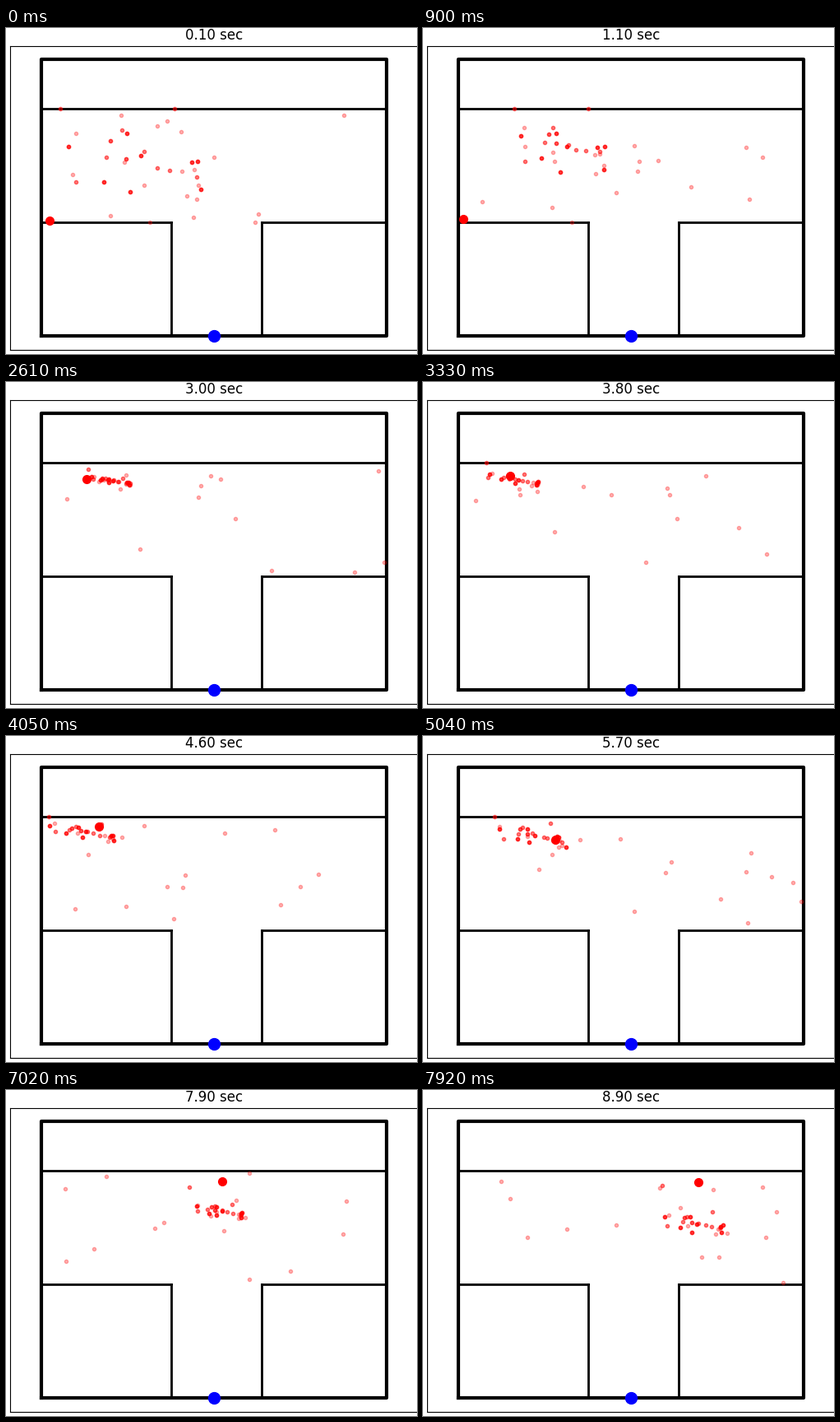
Animation, 500 px wide and 396 px high, one loop 8010 ms. Source, as a matplotlib script:

```python
import numpy as np
import matplotlib.pyplot as plt
from matplotlib.animation import FuncAnimation

W, H, DPI = 500, 396, 100
STEPS, INTERVAL = 89, 90
X0, X1, Y0, Y1 = 43, 463, 98.4, 236.4  # walkable strip
FLOOR, CEIL = 374.4, 38.4
GROUPS, STRAYS = 26, 13
SLOPE = 0.17  # tilt of the swarm

# step, estimate x, y, swarm centre x, y, half length, scatter
KEYS = np.array([
    (0, 53, 234, 145, 160, 95, 36),
    (20, 45, 230, 180, 130, 28, 14),
    (29, 98, 118, 124, 119, 28, 2),
    (45, 113, 110, 88, 116, 45, 6),
    (56, 161, 126, 125, 120, 48, 9),
    (67, 183, 110, 176, 129, 26, 1),
    (88, 335, 112, 325, 162, 42, 9),
])

# each group of resampled particles keeps its place within the swarm
seeds = np.random.default_rng(4)
along = seeds.uniform(-1, 1, GROUPS)
across = seeds.normal(0, 1, GROUPS)
across *= np.abs(across)  # most groups stay near the axis
copies = seeds.integers(1, 5, GROUPS)


def state(i):
    return [np.interp(i, KEYS[:, 0], col) for col in KEYS.T[1:]]


def particles(i, cx, cy, half, scatter):
    rng = np.random.default_rng(i)
    dx = along * half + rng.normal(0, 2, GROUPS)
    dy = SLOPE * dx + across * scatter + rng.normal(0, 0.1 * scatter, GROUPS)
    swarm = np.column_stack([cx + dx, cy + dy]).repeat(copies, axis=0)
    strays = rng.uniform((X0, Y0), (X1, Y1), (STRAYS, 2))
    return np.clip(np.vstack([swarm, strays]), (X0, Y0), (X1, Y1))


fig = plt.figure(figsize=(W / DPI, H / DPI), dpi=DPI)
left, top, width, height = 5, 21.6, 496, 369.6
ax = fig.add_axes([left / W, 1 - (top + height) / H, width / W, height / H])
ax.set(xlim=(left, left + width), ylim=(top + height, top), xticks=[], yticks=[])


def wall(xs, ys, lw=2):
    ax.plot(xs, ys, "k-", lw=lw)


wall([X0, X1, X1, X0, X0], [FLOOR, FLOOR, CEIL, CEIL, FLOOR], 3)
wall([X0, X1], [Y0, Y0])
for side, corner in ((X0, 201), (X1, 311)):
    wall([side, corner], [Y1, Y1])
    wall([corner, corner], [Y1, FLOOR])

ax.plot(253, FLOOR, "bo", ms=10)
cloud, = ax.plot([], [], "ro", ms=3, alpha=0.3)
guess, = ax.plot([], [], "ro", ms=7)
title = ax.set_title("", pad=5.3)


def draw(i):
    x, y, *swarm = state(i)
    cloud.set_data(*particles(i, *swarm).T)
    guess.set_data([x], [y])
    title.set_text(f"{(i + 1) / 10:.2f} sec")
    return cloud, guess, title


anim = FuncAnimation(fig, draw, frames=STEPS, interval=INTERVAL, repeat=True)
plt.show()
```
